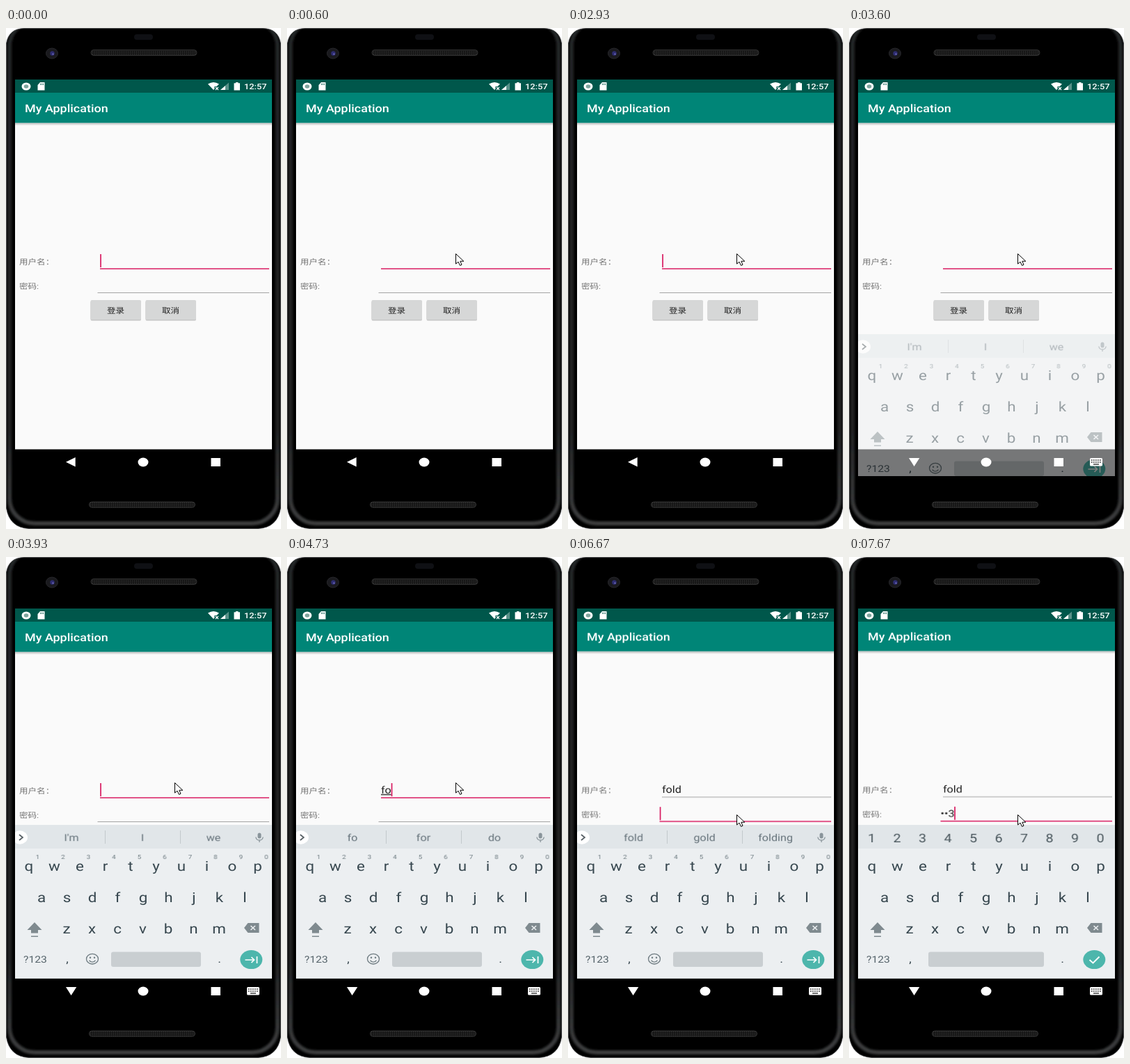
Animation of 395x720 px, one loop 8 s. Source, as an HTML page:

```html
<!DOCTYPE html>
<html lang="zh-CN">
<head>
<meta charset="utf-8">
<title>Login form</title>
<style>
html, body { margin: 0; width: 100%; height: 100%; overflow: hidden; background: #fff; }
svg { display: block; width: 100vw; height: 100vh; }
text {
  font-family: Roboto, "Noto Sans CJK SC", "Noto Sans CJK", sans-serif;
  text-rendering: geometricPrecision; white-space: pre;
}
.mid { text-anchor: middle; }
.bold { font-weight: 500; }
.underlined { text-decoration: underline; }
#pointer { animation: pointer 8s step-end infinite; }
#keyboard { animation: rise 8s step-end infinite; }
#content { animation: pan 8s step-end infinite; }
@keyframes pointer {
  0% { opacity: 0; transform: translate(262px, 470px); }
  2.5% { opacity: 1; transform: translate(262px, 470px); animation-timing-function: steps(6, start); }
  7.5% { opacity: 1; transform: translate(242px, 324px); }
  76.625% { opacity: 1; transform: translate(242px, 324px); animation-timing-function: steps(5, start); }
  80.875%, 100% { opacity: 1; transform: translate(242px, 370px); }
}
@keyframes rise {
  0% { opacity: 0; transform: translateY(55px); }
  45% { opacity: .5; transform: translateY(55px); }
  46.625% { opacity: .9; transform: translateY(12px); }
  47.5%, 100% { opacity: 1; transform: none; }
}
@keyframes pan {
  0% { transform: none; }
  82.5% { transform: translateY(-.8px); }
  84.125%, 100% { transform: translateY(-1.2px); }
}
</style>
</head>
<body>
<svg viewBox="0 0 395 720" preserveAspectRatio="none">
  <defs>
    <clipPath id="screen"><rect x="13" y="74.400" width="369" height="568.800"/></clipPath>
    <linearGradient id="edge" x2="0" y2="1">
      <stop offset="0" stop-color="#242526"/><stop offset=".8" stop-color="#202122"/>
      <stop offset="1" stop-color="#3c3d3e"/>
    </linearGradient>
    <linearGradient id="drop" x2="0" y2="1">
      <stop offset="0" stop-opacity=".26"/><stop offset="1" stop-opacity="0"/>
    </linearGradient>
    <filter id="soft" x="-5%" y="-5%" width="110%" height="110%"><feGaussianBlur stdDeviation="1.800"/></filter>
    <clipPath id="shell"><use href="#body"/></clipPath>
    <pattern id="mesh" width="3" height="3" patternUnits="userSpaceOnUse">
      <rect width="3" height="3" fill="#151515"/><circle cx="1.500" cy="1.500" r=".8" fill="#393939"/>
    </pattern>
  </defs>

  <path id="body" d="M.5 22Q4 1 26 .5H369Q391 1 394.500 22V690Q390 718 362 719.500H33Q5 718 .5 690Z"/>
  <g clip-path="url(#shell)">
    <rect x="5" y="-10" width="385" height="722" rx="36" fill="none" stroke="url(#edge)" stroke-width="6" filter="url(#soft)"/>
  </g>
  <use href="#body" fill="none" stroke="#4a4b4c" stroke-width=".8"/>
  <rect x="184" y="9" width="27" height="8" rx="4" fill="#0f1014"/>
  <ellipse cx="66" cy="36.500" rx="8.500" ry="7.500" fill="#1a1a1e" stroke="#28282c"/>
  <circle cx="66.500" cy="36.500" r="3.200" fill="#2e2d72"/>
  <circle cx="67.500" cy="37.500" r="1" fill="#8580cf"/>
  <rect x="122" y="31.500" width="152" height="8" rx="4" fill="url(#mesh)" stroke="#353535"/>
  <rect x="119.500" y="681" width="152" height="8" rx="4" fill="url(#mesh)" stroke="#353535"/>

  <g clip-path="url(#screen)">
    <rect x="13" y="74" width="369" height="531.700" fill="#fafafa"/>
    <g id="content">
      <rect x="13" y="136.300" width="369" height="4" fill="url(#drop)"/>
      <rect x="13" y="92" width="369" height="44.300" fill="#008577"/>
      <g stroke="#d81b60" stroke-width="1.550">
        <path data-on="0-6600" d="M135 346H378"/>
        <path data-on="6600-8000" d="M131.500 380.700H378"/>
      </g>
      <g stroke="#a4a4a4">
        <path data-on="6600-8000" d="M135 345.900H378"/>
        <path data-on="0-6600" d="M131.500 380.500H378"/>
      </g>
      <g id="buttons"></g>
    </g>

    <rect x="13" y="74" width="369" height="19" fill="#00574b"/>
    <g id="status" fill="#fff">
      <ellipse cx="29" cy="84" rx="6.500" ry="5.500"/>
      <ellipse cx="29" cy="84" rx="3.300" ry="2.700" fill="#7fa49d"/>
      <path d="M49 78H55.500V89.500H45.500V82Z"/>
      <path d="M49.500 79.500V82M51.500 79.500V82M53.500 79.500V82" stroke="#00574b" stroke-width=".8"/>
      <path d="M290 80.500Q298 75.500 306 80.500L302.500 84H299.500V87.500L298 89Z"/>
      <path d="M301 85L305 89M305 85L301 89" stroke="#fff" stroke-width="1.200"/>
      <path d="M320 78.500V89H308Z" opacity=".35"/>
      <path d="M315 83V89H308Z"/>
      <path d="M330 78H333.500V79.300H336V89.500H327.500V79.300H330Z"/>
    </g>

    <rect x="13" y="605.700" width="369" height="38" fill="#000"/>
    <g id="keyboard">
      <rect x="13" y="385" width="369" height="220.700" fill="#eceff1"/>
      <rect x="13" y="385" width="369" height="34" fill="#e1e6e9"/>
      <g id="keys" fill="#37474f"></g>
      <g fill="#7f8a8f">
        <path d="M41 525L51.500 536H46V540.500H36V536H30.500Z"/>
        <rect x="36" y="544.500" width="10" height="1.500"/>
        <path d="M342 533L347.500 526H363.500V540H347.500Z"/>
        <path d="M351.500 530L358 536M358 530L351.500 536" stroke="#eceff1" stroke-width="1.600"/>
      </g>
      <ellipse cx="352.300" cy="578.600" rx="16" ry="13.500" fill="#4db6ac"/>
      <g data-on="3600-6800">
        <path d="M142.500 393V412M250.500 393V412" stroke="#c3c9cc"/>
        <ellipse cx="20" cy="403" rx="11" ry="9.700" fill="#fff"/>
        <path d="M19 399L24 403L19 407" fill="none" stroke="#555e63" stroke-width="1.700"/>
        <rect x="361.500" y="396.500" width="5" height="8" rx="2.500" fill="#89949a"/>
        <path d="M358.800 402.500Q359.500 407 364 407T369.200 402.500M364 407V410" fill="none" stroke="#89949a" stroke-width="1.300"/>
        <g fill="none" stroke="#6f7c82" stroke-width="1.300">
          <ellipse cx="124" cy="577.700" rx="8.500" ry="7.300"/>
          <path d="M119.500 579.700Q124 584.700 128.500 579.700"/>
        </g>
        <g fill="#6f7c82"><circle cx="121" cy="575.700" r="1.200"/><circle cx="127" cy="575.700" r="1.200"/></g>
        <rect x="151" y="567.500" width="129" height="21.500" rx="3" fill="#c9ced1"/>
        <path d="M343.500 579H356.500M352.500 575L356.500 579L352.500 583M360.500 574V584" fill="none" stroke="#fff" stroke-width="1.700"/>
      </g>
      <g data-on="6800-8000">
        <rect x="114" y="567.500" width="166" height="21.500" rx="3" fill="#c9ced1"/>
        <path d="M345.500 579L350.500 583.500L359.500 574.500" fill="none" stroke="#fff" stroke-width="1.900"/>
      </g>
    </g>

    <g fill="#fff">
      <path data-on="0-3600" d="M99.700 617V630.500L86 623.800Z"/>
      <path data-on="3600-8000" d="M86 618H101.300L93.600 630Z"/>
      <ellipse cx="197" cy="624" rx="7.500" ry="6.500"/>
      <rect x="294.500" y="618" width="13.500" height="12"/>
      <g data-on="3600-8000">
        <rect x="346" y="618" width="18" height="11.500" rx="1.500"/>
        <path d="M348 621H362M348 624H362" stroke="#222" stroke-width="1.300" stroke-dasharray="1.600 1.400"/>
        <path d="M351 627H359" stroke="#222" stroke-width="1.300"/>
      </g>
    </g>
  </g>

  <path id="pointer" d="M.5 .5V15L4 12L6.500 17.300L9 16.200L6.800 11.200H11.800Z" fill="#fff" stroke="#000"/>
</svg>
<script>
const LOOP = 8000;
const find = id => document.getElementById(id);

function add(parent, name, attrs) {
  const node = document.createElementNS('http://www.w3.org/2000/svg', name);
  for (const key in attrs) node.setAttribute(key, attrs[key]);
  return parent.appendChild(node);
}

// Sizes are in device units; the whole phone screen is shown slightly squashed.
function label(parent, words, x, y, size, attrs = {}) {
  const transform = `translate(${x} ${y}) scale(.897 .778)`;
  add(parent, 'text', { transform, 'font-size': size, ...attrs }).textContent = words;
}

const content = find('content'), keys = find('keys'), buttons = find('buttons');
const mid = { class: 'mid' };

label(find('status'), '12:57', 342, 88, 14.3, { class: 'bold' });
label(content, 'My Application', 27, 120.5, 20, { class: 'bold', fill: '#fff' });
label(content, '用户名：', 19, 340, 14, { fill: '#737373' });
label(content, '密码:', 19, 375, 14, { fill: '#737373' });

[['登录', 121.5], ['取消', 200.5]].forEach(([words, x]) => {
  const box = { x, width: 72.5, height: 28.5, rx: 2 };
  add(buttons, 'rect', { ...box, y: 392.5, fill: '#000', opacity: .12 });
  add(buttons, 'rect', { ...box, y: 391.5, fill: '#000', opacity: .16 });
  add(buttons, 'rect', { ...box, y: 391, fill: '#d6d7d7' });
  label(buttons, words, x + 36, 410, 14, { class: 'mid bold', fill: '#212121' });
});

function caret(x, y, on) {
  add(content, 'rect', { x: x - .8, y, width: 1.7, height: 19, fill: '#d81b60', 'data-on': on });
}

const ink = { fill: '#212121' };
caret(136, 325, '0-400 930-1400 1930-2470 2930-3470 3930-4470');
[['f', 142, '4530-4730'], ['fo', 150.5, '4730-4930'], ['fol', 154.5, '4930-5400'],
 ['fold', 163, '5400-6600', '5400-5930 6460-6600']].forEach(([words, x, on, blink = on]) => {
  label(content, words, 135, 340, 18, { ...ink, class: 'underlined', 'data-on': on });
  caret(x, 325, blink);
});
label(content, 'fold', 135, 340, 18, { ...ink, 'data-on': '6600-8000' });

caret(132.5, 360, '6600-7130');
[['1', 141, '7330-7470'], ['•2', 146.5, '7470-7670'], ['••3', 152, '7670-8000']].forEach(([words, x, on]) => {
  label(content, words, 131.5, 375, 18, { ...ink, 'data-on': on });
  caret(x, 360, on);
});

const keyRow = (letters, x, y, size, attrs) =>
  [...letters].forEach((c, i) => label(keys, c, x + 36.5 * i, y, size, { ...mid, ...attrs }));
keyRow('qwertyuiop', 33, 451, 25);
keyRow('asdfghjkl', 51, 496, 25);
keyRow('zxcvbnm', 87, 541, 25);
keyRow('1234567890', 45.5, 434, 11, { fill: '#6f7c82', 'data-on': '3600-6800' });
keyRow('1234567890', 32.5, 410, 22, { fill: '#4a575d', 'data-on': '6800-8000' });
label(keys, '?123', 42, 582.7, 17.5, { ...mid, fill: '#55636a' });
label(keys, ',', 88, 583, 20, mid);
label(keys, '.', 306.5, 583, 20, mid);

[["I'm I we", '3600-4600'], ['f for of', '4600-4730'], ['fo for do', '4730-4930'],
 ['fol folk going', '4930-5400'], ['fold gold folding', '5400-6800']].forEach(([words, on]) =>
  words.split(' ').forEach((word, i) =>
    label(keys, word, 94 + 102 * i, 408.5, 18, { ...mid, fill: '#65727a', 'data-on': on })));

// Turn each data-on list of "from-to" spans (ms) into a stepped opacity animation.
const sheet = document.createElement('style');
const seen = new Map();
document.querySelectorAll('[data-on]').forEach(node => {
  const spans = node.dataset.on;
  if (!seen.has(spans)) {
    const name = 'on' + seen.size;
    const steps = spans.split(' ').flatMap(span =>
      span.split('-').map((ms, i) => `${ms / LOOP * 100}% { opacity: ${1 - i} }`));
    const start = spans.startsWith('0-') ? '' : '0% { opacity: 0 }';
    sheet.textContent += `@keyframes ${name} { ${start} ${steps.join(' ')} }\n`;
    seen.set(spans, name);
  }
  node.style.animation = `${seen.get(spans)} ${LOOP}ms step-end infinite`;
});
document.head.append(sheet);
</script>
</body>
</html>
```
